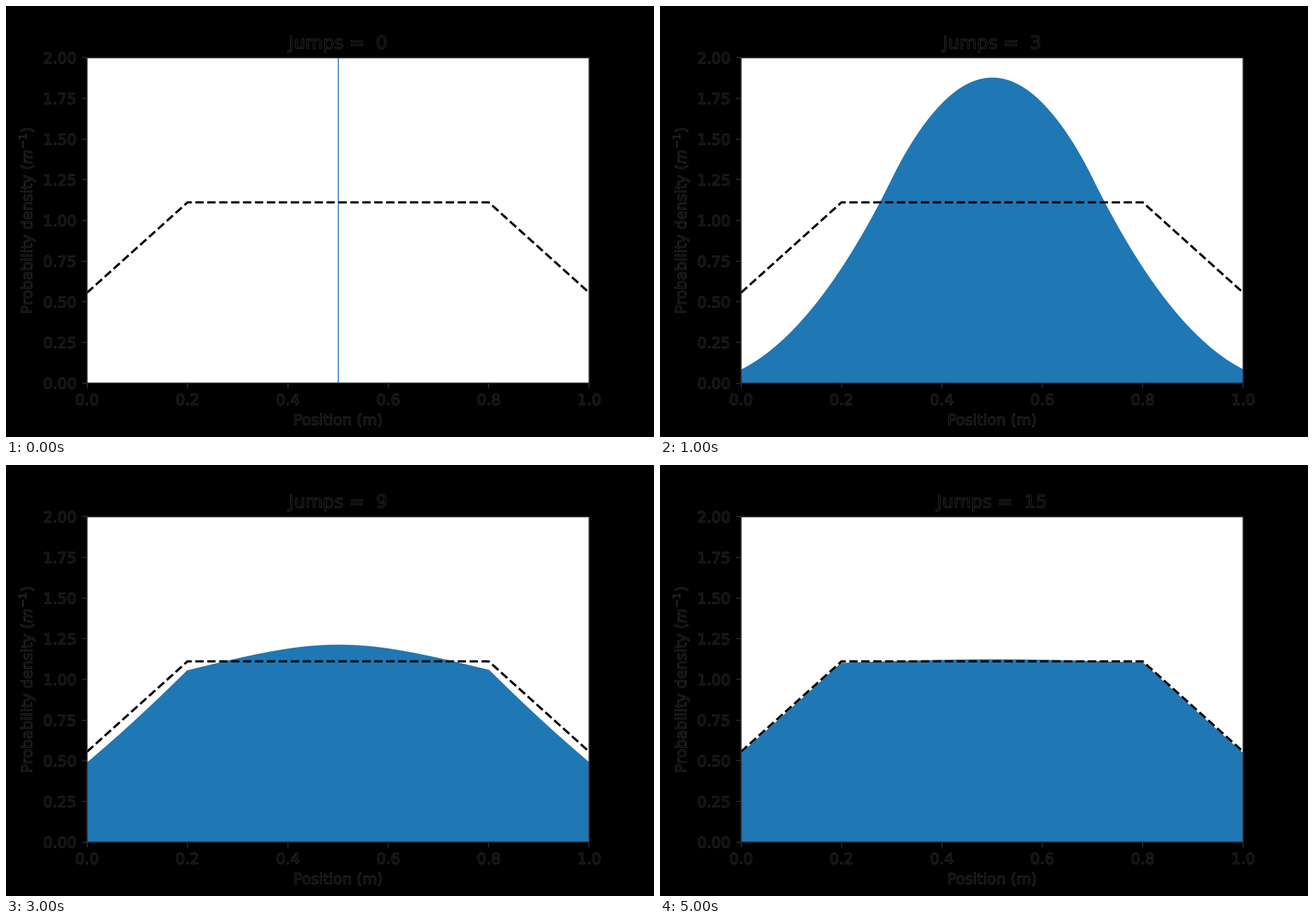
Recreate the animation shown at these times as a matplotlib script. Size 917 by 611 pixels, loop 5340 ms.

```python
import numpy as np
import matplotlib.pyplot as plt
from matplotlib.animation import FuncAnimation
from matplotlib.patheffects import Stroke

DPI = 152.8334
LOOP = 5340
TICK = 30
JUMPS = 15
POINTS = 1000
REACH = 0.2
INK = "0.16"

plt.rcParams.update({
    "font.family": "DejaVu Sans", "font.size": 10, "path.snap": False,
    "axes.edgecolor": INK, "xtick.color": INK, "ytick.color": INK,
    "xtick.labelcolor": "black", "ytick.labelcolor": "black",
})

# black letters stand out from the black page only by a faint rim
RIM = [Stroke(linewidth=0.33, foreground="0.22")]


def densities(x):
    """Density after each jump, uniform over the reachable part of the box."""
    near = (np.abs(x[:, None] - x[None, :]) <= REACH).astype(float)
    kernel = near / near.sum(axis=0)
    p = np.zeros(POINTS)
    p[POINTS // 2] = POINTS - 1
    steps = [p]
    for _ in range(JUMPS):
        steps.append(kernel @ steps[-1])
    return steps


def area(x, p):
    return np.column_stack([np.r_[x[0], x, x[-1]], np.r_[0, p, 0]])


def caption(n):
    return f"Jumps =  {n}"


def add_caption(zorder):
    return ax.annotate(caption(0), (0.5, 1), xycoords="axes fraction",
                       xytext=(0, 6), textcoords="offset points",
                       ha="center", va="baseline", size=12,
                       path_effects=RIM, zorder=zorder)


x = np.linspace(0, 1, POINTS)
steps = densities(x)
width = np.minimum(x + REACH, 1) - np.maximum(x - REACH, 0)
limit = width / 0.36

fig = plt.figure(figsize=(6, 3.99784), dpi=DPI, facecolor="black")
ax = fig.add_axes([0.125, 0.125, 0.775, 0.755], facecolor="white")
ax.set_xlim(0, 1)
ax.set_ylim(0, 2)
ax.set_xlabel("Position (m)", path_effects=RIM)
ax.set_ylabel("Probability density ($m^{-1}$)", path_effects=RIM)
for label in ax.get_xticklabels() + ax.get_yticklabels():
    label.set_path_effects(RIM)

fill, = ax.fill(*area(x, steps[0]).T, color="#1f77b4", linewidth=0, zorder=1)
ax.plot(x, limit, "--", color="black", linewidth=1.5)
ghost = add_caption(4)
title = add_caption(5)


def update(i):
    n = int((i + 1) * TICK * 3 / 1000 - 1e-9)
    n = min(n, JUMPS)
    fill.set_xy(area(x, steps[n]))
    title.set_text(caption(n))
    # the first caption lingers under the second one
    ghost.set_visible(n == 1)
    return fill, title, ghost


anim = FuncAnimation(fig, update, frames=LOOP // TICK, interval=TICK,
                     init_func=lambda: update(0), repeat=True, repeat_delay=0)

plt.show()
```
